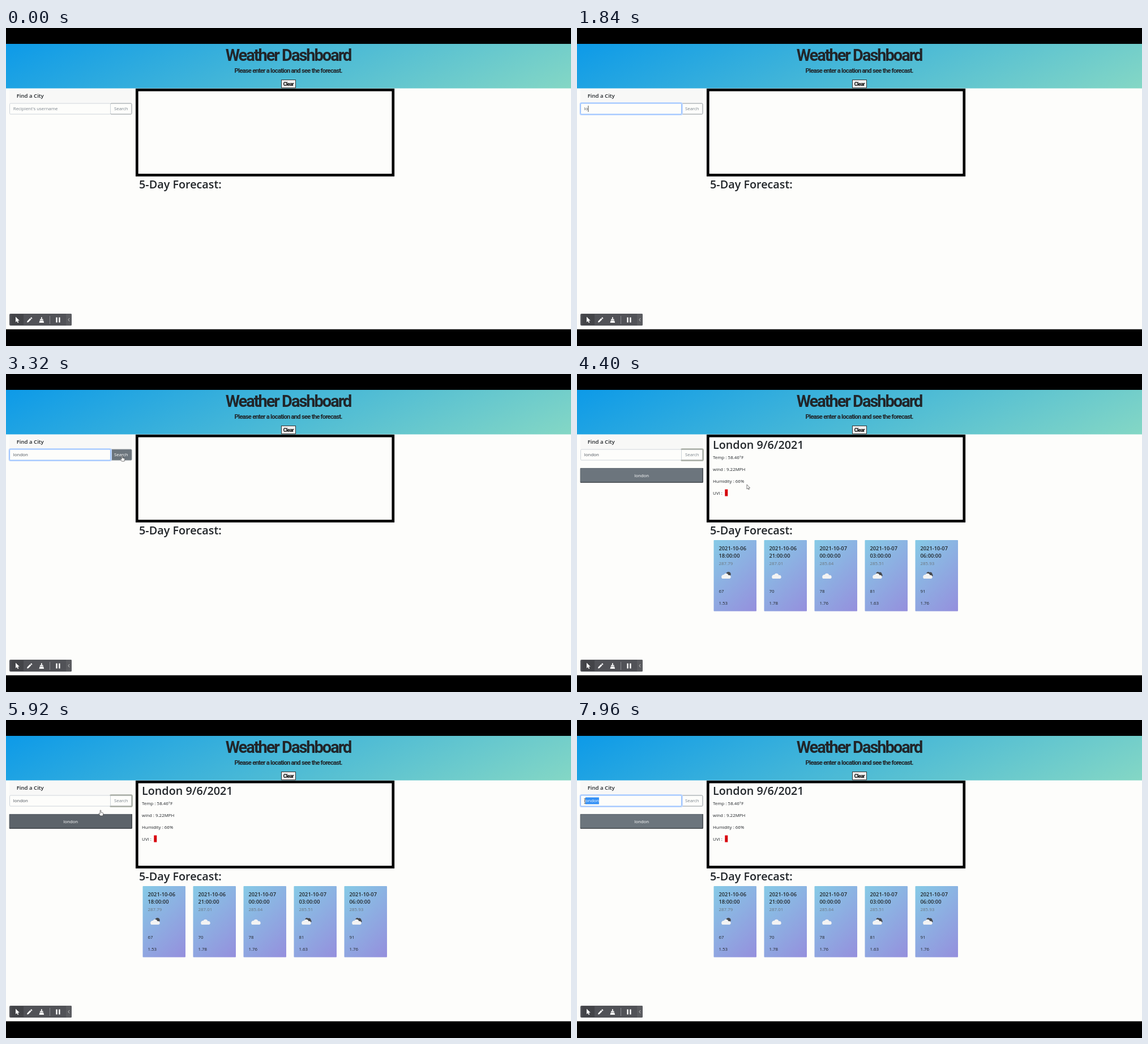
Recreate the animation shown at these times as an HTML page. Size 998 by 561 pixels, loop 8 s.

```html
<!DOCTYPE html>
<html lang="en">
<head>
<meta charset="utf-8">
<title>Weather Dashboard</title>
<style>
html, body { margin: 0; width: 100%; height: 100%; overflow: hidden; background: #000; }
svg { display: block; width: 998px; height: 561px; }
text { font: 7.9px "Open Sans", "Noto Sans", sans-serif; fill: #212529; white-space: pre; }
.narrow { font-family: Roboto, "Liberation Sans", sans-serif; font-weight: 700; letter-spacing: -.07em; text-anchor: middle; }
.head { font-size: 19.8px; font-weight: 600; }
.label { font-size: 9.6px; font-weight: 600; }
.date { font-size: 9.3px; font-weight: 600; }
.muted { fill: #6c757d; }
.mid { text-anchor: middle; }
</style>
</head>
<body>
<svg viewBox="0 0 998 561">
  <defs>
    <linearGradient id="sky" gradientUnits="userSpaceOnUse" x1="395" y1="-156" x2="603" y2="290">
      <stop stop-color="#0d9ae8"/><stop offset="1" stop-color="#84d7c5"/>
    </linearGradient>
    <linearGradient id="dusk" gradientUnits="userSpaceOnUse" x1="-12.5" y1="12.5" x2="88" y2="113">
      <stop stop-color="#86cae6"/><stop offset="1" stop-color="#958fdd"/>
    </linearGradient>
    <path id="cloud" d="M4 15a4 4 0 0 1 0-6 4 4 0 0 1 3-1 4.3 4.3 0 0 1 8 1 3 3 0 0 1 2 6z" fill="#f3f3f3"/>
    <path id="dark" d="M9 7a3 3 0 0 1 5-3 3.2 3.2 0 0 1 5 3 2.4 2.4 0 0 1 0 4l-4 1z" fill="#45484d"/>
    <circle id="moon" cx="15" cy="7.3" r="4.2" fill="#45484d"/>
  </defs>
  <rect width="998" height="561"/>
  <rect y="28" width="998" height="503.5" fill="#fdfdfb"/>
  <rect y="28" width="998" height="78.5" fill="url(#sky)"/>
  <text class="narrow" x="498.5" y="58" style="font-size:29px">Weather Dashboard</text>
  <text class="narrow" x="498.7" y="79" style="font-size:11.3px">Please enter a location and see the forecast.</text>
  <rect x="486.5" y="91.5" width="25" height="14" fill="#efefef" stroke="#333"/>
  <text class="narrow" x="498.8" y="102.3" style="font-size:9px;fill:#000">Clear</text>

  <rect x="6" y="107" width="217" height="25" fill="#f8f8f7"/>
  <text class="label" x="18.7" y="123.4">Find a City</text>
  <rect id="search" x="184.5" y="133" width="37.5" height="19" rx="1.5" fill="#fdfdfb" stroke="#8b9298"/>
  <text id="searchText" class="mid" x="203.3" y="145.4">Search</text>
  <rect id="ring" x="183.8" y="132.3" width="39" height="20.4" rx="2" fill="none" stroke="#a9aea5" stroke-width="2.2"/>
  <rect id="glow" x="6" y="132.5" width="179.5" height="20" rx="2" fill="none" stroke="#c0d8ff" stroke-width="3"/>
  <rect id="field" x="6.5" y="133" width="178" height="19" rx="1.5" fill="#fdfdfb"/>
  <rect id="selection" y="136.5" height="12" fill="#3390f5"/>
  <text id="typed" x="12.8" y="145.4"><tspan id="plain"></tspan><tspan id="picked" fill="#fff"></tspan></text>
  <rect id="caret" y="137" width=".8" height="11" fill="#222"/>

  <rect x="231.3" y="109.2" width="452.5" height="150.3" fill="none" stroke="#000" stroke-width="4.7"/>
  <text class="head" x="235" y="283">5-Day Forecast:</text>
  <g id="results">
    <rect id="recent" x="6" y="166" width="216.5" height="25.5"/>
    <path d="M6 191V166.4H222" fill="none" stroke="#596067" stroke-width=".8"/>
    <path d="M6 191.2H222.2V166" fill="none" stroke="#22262a"/>
    <text class="mid" x="114.2" y="181.6" style="fill:#fff">london</text>
    <text class="head" x="240" y="132">London 9/6/2021</text>
    <text x="240" y="150">Temp : 58.46°F</text>
    <text x="240" y="171">wind : 9.22MPH</text>
    <text x="240" y="192">Humidity : 66%</text>
    <text x="240" y="212.7">UVI :</text>
    <rect x="261.3" y="203.5" width="5" height="12" fill="#dc000b"/>
    <text x="261.5" y="212.7" style="fill:#b50009">0</text>
    <g id="cards"></g>
  </g>

  <rect x="6" y="504" width="110" height="21" rx="2" fill="#515257"/>
  <rect x="9" y="505" width="22" height="19" fill="#434448"/>
  <path d="M106 504h8a2 2 0 0 1 2 2v17a2 2 0 0 1-2 2h-8z" fill="#5b5c60"/>
  <path d="M77.5 508v14" stroke="#8b8c90"/>
  <path d="M112 512l-2 2.7 2 2.7" fill="none" stroke="#ddd" stroke-width=".8"/>
  <g fill="#fff">
    <path d="M17 509.5v9.5l2.2-2 1.5 3.2 1.6-.7-1.5-3.2h3z"/>
    <path d="M37 519.5l.6-2.4 5-5 1.9 1.9-5 5zM43.2 511.5l1-1a.7.7 0 0 1 1 0l.9.9a.7.7 0 0 1 0 1l-1 1z"/>
    <path d="M62 510h1.6v3.6h2v2h-5.6v-2h2zM59.5 516.2h6.6l1 3.8h-8.6z"/>
    <path d="M88.3 510.5h2.4v9h-2.4zM93.2 510.5h2.4v9h-2.4z"/>
  </g>

  <g id="pointer">
    <path id="arrow" d="M0 0v8l1.9-1.6 1.2 2.6 1.2-.6-1.2-2.4h2.5z" fill="#fff" stroke="#444" stroke-width=".7"/>
    <path id="hand" d="M-.8.5Q0-.5.8.5V4l3.2.8q1 .3.8 1.5L4 10H-.5L-3 6.5q0-1.2 1-.9l1.2.9z" fill="#fff" stroke="#444" stroke-width=".7"/>
    <path id="beam" d="M-1.5-4.5h3M0-4.5v9M-1.5 4.5h3" fill="none" stroke="#555" stroke-width=".7"/>
  </g>
</svg>
<script>
const LOOP = 8000;
const WORD = "london";
const KEY_TIMES = [1640, 1780, 1980, 2140, 2280, 2440];
const FOCUS = 480, CLICK = 3480, LOADED = 3760, DRAG = 6920, DRAG_END = 7640;
const HIDDEN = [[0, 120], [880, 2640]];

// time, x, y of the pointer tip
const ROUTE = [
  [0, 120, 205], [120, 120, 205], [440, 80, 143], [880, 80, 143],
  [2640, 95, 150], [3160, 205, 144], [3560, 205, 144],
  [4240, 300, 195], [5080, 300, 195], [5640, 180, 182],
  [5920, 167, 159], [6400, 60, 143], [6880, 39, 143],
  [7640, 14, 143], [8000, 14, 143]
];

// date, time, temperature, humidity, wind, dark part of the icon
const DAYS = [
  ["2021-10-06", "18:00:00", "287.79", 67, "1.53", "moon"],
  ["2021-10-06", "21:00:00", "287.01", 70, "1.78", ""],
  ["2021-10-07", "00:00:00", "285.64", 78, "1.76", ""],
  ["2021-10-07", "03:00:00", "285.51", 81, "1.63", "dark"],
  ["2021-10-07", "06:00:00", "285.93", 91, "1.76", "dark"]
];

const $ = id => document.getElementById(id);
const show = (id, on) => $(id).setAttribute("visibility", on ? "inherit" : "hidden");
const set = (id, attrs) => Object.entries(attrs).forEach(([k, v]) => $(id).setAttribute(k, v));
const line = (y, value, style = "") => `<text x="9" y="${y}" class="${style}">${value}</text>`;

$("cards").innerHTML = DAYS.map(([date, time, temp, humidity, wind, shade], i) => `
  <g transform="translate(${241.5 + i * 89} 293)">
    <rect width="75.5" height="125.5" rx="1" fill="url(#dusk)"/>
    ${line(18.3, date, "date")}${line(31, time, "date")}${line(43.7, temp, "muted")}
    <g transform="translate(11 53)">${shade && `<use href="#${shade}"/>`}<use href="#cloud"/></g>
    ${line(93, humidity)}${line(113.8, wind)}
  </g>`).join("");

const widthOf = (() => {
  const ctx = document.createElement("canvas").getContext("2d");
  ctx.font = getComputedStyle($("typed")).font;
  return text => ctx.measureText(text).width;
})();

function pointerAt(t) {
  const i = Math.max(1, ROUTE.findIndex(p => p[0] > t));
  const [t0, x0, y0] = ROUTE[i - 1], [t1, x1, y1] = ROUTE[i];
  const p = (t - t0) / (t1 - t0), e = p * p * (3 - 2 * p);
  return [x0 + (x1 - x0) * e, y0 + (y1 - y0) * e];
}

function draw(t) {
  const [x, y] = pointerAt(t);
  const loaded = t >= LOADED;
  const focused = t >= FOCUS && t < CLICK || t >= DRAG;
  const ringed = t >= CLICK && t < DRAG;
  const inRow = y > 133 && y < 152;
  const onSearch = inRow && x > 185 && x < 222;
  const onField = inRow && x > 6 && x <= 185;
  const onRecent = loaded && x > 6 && x < 222 && y > 158 && y < 192;
  const pointing = !HIDDEN.some(([a, b]) => t >= a && t < b);

  const count = KEY_TIMES.filter(k => t >= k).length;
  const drag = Math.min(1, Math.max(0, (t - DRAG) / (DRAG_END - DRAG)));
  const keep = count - Math.round(drag * 5);
  $("plain").textContent = count ? WORD.slice(0, keep) : "Recipient's username";
  $("picked").textContent = WORD.slice(keep, count);
  $("plain").style.fill = count ? "#495057" : "#7b848c";
  const edge = 12.8 + widthOf(WORD.slice(0, keep));
  set("selection", { x: edge, width: widthOf(WORD.slice(keep, count)) });

  const lastInput = Math.max(FOCUS, ...KEY_TIMES.filter(k => t >= k));
  show("caret", focused && t < CLICK && (t - lastInput) % 1060 < 530);
  set("caret", { x: edge });

  set("field", { stroke: focused ? "#86b7fe" : "#ced4da" });
  show("glow", focused);
  show("ring", ringed);
  set("search", { fill: onSearch ? "#6c757d" : "#fdfdfb" });
  $("searchText").style.fill = onSearch ? "#fff" : "#7b848c";

  show("results", loaded);
  set("recent", { fill: onRecent ? "#5c636a" : "#6c757d" });

  const hand = onSearch || onRecent;
  show("pointer", pointing);
  show("hand", hand);
  show("beam", onField);
  show("arrow", !hand && !onField);
  set("pointer", { transform: `translate(${x} ${y})` });
}

const start = performance.now();
function tick() {
  draw((performance.now() - start) % LOOP);
  requestAnimationFrame(tick);
}
tick();
</script>
</body>
</html>
```
